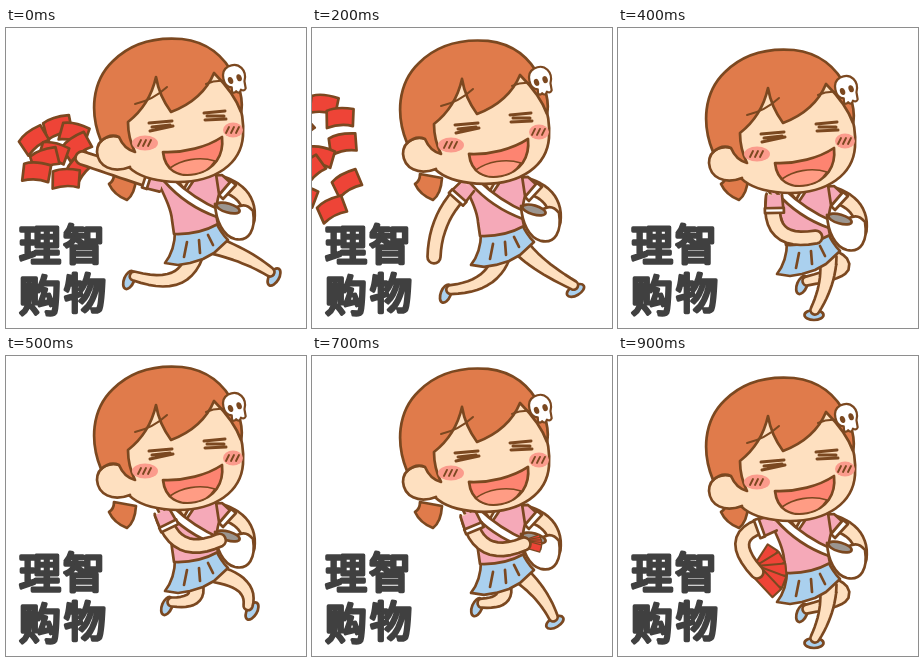
An HTML page for the animation above (1 s loop, 300 by 300 pixels).

```html
<!DOCTYPE html>
<html lang="zh">
<head>
<meta charset="utf-8">
<style>
html, body { margin: 0; width: 100%; height: 100%; overflow: hidden; background: #fff; }
svg { display: block; width: 100vw; height: 100vh; }
text { font: 400 42px "Noto Sans CJK SC", "Noto Sans CJK", sans-serif; fill: #404040; stroke: #404040;
  stroke-width: 3.4; stroke-linejoin: round; stroke-linecap: round; text-anchor: middle; }
.pose { opacity: 0; }
</style>
</head>
<body>
<svg viewBox="0 0 300 300">
  <text x="34 78" y="233 232">理智</text>
  <text x="34 79" y="283 281">购物</text>
  <g id="stage" stroke="#7b4820" stroke-width="2.7" stroke-linejoin="round" stroke-linecap="round"></g>
</svg>
<script>
const SKIN = '#fee0c0', HAIR = '#e07b4b', PINK = '#f5a9b8', BLUE = '#aad0ee', RED = '#ee4437', BROWN = '#7b4820';

const path = (d, fill = 'none', more = '') => `<path d="${d}" fill="${fill}" ${more}/>`;
const oval = (x, y, rx, ry, fill, turn = 0, more = '') =>
  `<ellipse rx="${rx}" ry="${ry}" fill="${fill}" transform="translate(${x} ${y}) rotate(${turn})" ${more}/>`;
const mix = (a, b, t) => a.map((v, i) => v + (b[i] - v) * t);

// Tapered limb bent at the middle joint, round at the far end
function limb(a, joint, b, w0, w1) {
  const c = joint.map((v, i) => v * 1.5 - (a[i] + b[i]) / 4);
  const left = [], right = [], n = 12;
  for (let i = 0; i <= n; i++) {
    const t = i / n, p = mix(a, c, t), q = mix(c, b, t), [x, y] = mix(p, q, t);
    const turn = Math.atan2(q[1] - p[1], q[0] - p[0]), w = (w0 + (w1 - w0) * t) / 2;
    const dx = -Math.sin(turn) * w, dy = Math.cos(turn) * w;
    left.push(`${(x + dx).toFixed(1)} ${(y + dy).toFixed(1)}`);
    right.unshift(`${(x - dx).toFixed(1)} ${(y - dy).toFixed(1)}`);
  }
  return path(`M${left.join('L')}A${w1 / 2} ${w1 / 2} 0 0 0 ${right.join('L')}`, SKIN);
}

function leg(hip, knee, foot, heel, turn) {
  const ankle = foot.map((v, i) => v + heel[i]);
  return oval(...foot, 9.5, 5, BLUE, turn) + limb(hip, knee, ankle, 17, 9);
}

// Each jump goes from a spread pose (u = 0) to standing on the front foot (u = 1)
const jumps = [
  { front: [268, 249], back: [123, 252], knee: [171, 255], dip: 18 },
  { front: [246, 255], back: [161, 250], knee: [190, 244], dip: 0 }
];

function legs(jump, u, drop) {
  const front = [mix(jump.front, [196], u ** 4)[0], jump.front[1] + (287 - jump.front[1]) * u ** 1.5];
  const back = mix(jump.back, [184, 257], u ** 2.5);
  back[1] += jump.dip * Math.sin(Math.PI * u * u);
  return leg(mix([188, 228], [213, 230], u ** 4), mix(jump.knee, [230, 241], u ** 4), back, [5, -4], 112)
    + leg([210, 218 + drop], mix([240, 229], [209, 255], u ** 1.5), front, [-4 + 5 * u, -5], -60 * (1 - u));
}

const SHOULDER = [156, 156];

function arm(hand) {
  const dx = hand[0] - SHOULDER[0], dy = hand[1] - SHOULDER[1], d = Math.hypot(dx, dy);
  const bend = Math.sqrt(Math.max(0, 41 ** 2 - d * d / 4)) / d;
  const elbow = [SHOULDER[0] + dx / 2 - dy * bend, SHOULDER[1] + dy / 2 + dx * bend];
  const turn = Math.atan2(elbow[1] - SHOULDER[1], elbow[0] - SHOULDER[0]) * 180 / Math.PI;
  return limb(SHOULDER, elbow, hand, 15, 13)
    + `<g transform="translate(${SHOULDER}) rotate(${turn})">`
    + path('M0 -8L14 -9V9L0 8', PINK) + path('M13 -9.5L18 -9.5V9.5L13 9.5Z', '#fff') + '</g>';
}

// Hand positions at a few steps of the loop
const reach = [[0, 76, 130], [1, 68, 148], [2, 122, 227], [3, 182, 212], [5, 214, 184], [7, 212, 186], [9, 139, 205]];

function handAt(step) {
  const i = Math.max(1, reach.findIndex(k => k[0] >= step)), a = reach[i - 1], b = reach[i];
  return mix(a, b, (step - a[0]) / (b[0] - a[0])).slice(1);
}

// Thrown cards drift left while they spread and flutter
function thrown(step) {
  let out = '';
  for (let i = 0; i < 9 && step < 4; i++) {
    const x = 52 + 24 * Math.sin(i * 2.4) - 20 * step;
    const y = 125 + 2 * step + (i - 4) * 6.5 * (1 + step * .5);
    const turn = -18 + 32 * Math.sin(i * 1.9 + step * .4);
    out += `<g transform="translate(${x} ${y}) rotate(${turn})">` + path('M-13 -8Q-3 -12 14 -8L12 9Q0 5 -14 9Z', RED) + '</g>';
  }
  return out;
}

// Cards pulled out of the bag open as a fan in the hand
function fan(step, [x, y]) {
  const open = (step - 6) / 3;
  let out = '';
  for (let i = 0; i < 5 && open > 0; i++)
    out += `<g transform="translate(${x} ${y}) rotate(${(i - 2.2) * 26 * open}) scale(${.4 + .6 * open})">`
      + path('M2 -6H29V6H2Z', RED, 'stroke-width="2"') + '</g>';
  return out;
}

const ponytail = path('M108 146Q108 153 103 156Q108 167 121 172Q129 166 130 150Z', HAIR);

const body = path('M169 203C169 216 166 226 159 235L172 237L184 235L197 231L208 225L222 212C217 207 213 201 210 194Z', BLUE)
  + path('M181 214L178 229M193 212L194 225M202 207L207 217')
  + limb([216, 156], [240, 168], [243, 192], 15, 11)
  + path('M204 148L216 147L227 157L216 168L206 163Z', PINK)
  + path('M225 153L230 157L217 171L213 167Z', '#fff')
  + path('M150 150C158 167 165 180 166 192L168 206Q192 207 212 196C209 186 210 178 213 166L210 146Z', PINK)
  + path('M164 151L178 167L188 152', '#fff')
  + path('M170 150L178 161L184 150Z', SKIN)
  + path('M158 153L166 150Q188 171 214 182L211 189Q180 178 158 153Z', '#fff')
  + path('M209 176C210 193 217 208 229 211C243 214 250 202 247 183C243 178 239 176 234 178C226 182 216 180 209 176Z', '#fff')
  + oval(222, 180, 12, 4.5, '#9b9691', 16);

const skull = '<g transform="translate(229 50) rotate(-18)">'
  + path('M-6 8C-14 5 -13 -11 -3 -13C9 -15 14 -3 8 6L7 13Q5 16 2 13Q-1 17 -3 13Q-6 15 -7 12Z', '#fff', 'stroke-width="2.2"')
  + oval(-5, 1, 2.6, 3.6, BROWN, 0, 'stroke="none"') + oval(4, 1, 2.6, 3.6, BROWN, 0, 'stroke="none"') + '</g>';

const blush = (x, y, rx) => oval(x, y, rx, 7.5, '#fb9b8c', 0, 'stroke="none"')
  + path([-4, 1, 6].map(d => `M${x + d} ${y - 3}l-3 6`).join(''), 'none', 'stroke-width="1.9"');

const head = path('M108 108C114 139 130 153 172 154C209 154 235 136 237 108C238 95 236 82 231 68L208 42L145 48Z', SKIN)
  + path('M120 112C105 103 91 111 91 124C92 138 106 146 124 139', SKIN)
  + path(`M95 113C84 86 85 54 107 33C127 13 152 9 176 11C202 14 219 29 229 50
    C235 63 237 75 235 84C229 67 218 55 208 45C201 62 186 76 165 84
    C157 73 152 61 150 49C146 67 136 83 122 94Q122 110 129 124Q118 121 113 109Q104 105 95 113Z`, HAIR)
  + path('M129 76Q147 72 161 59M200 56Q209 52 219 53', 'none', 'stroke-width="2"')
  + blush(139, 115, 13) + blush(227, 102, 10)
  + path('M143 95L166 93M146 99L164 97M144 103L167 98M198 85L219 83M201 88H218M199 92L220 91', 'none', 'stroke-width="3"')
  + path('M157 124C178 125 201 119 216 109C218 127 209 142 189 146C173 149 159 143 157 124Z', '#fd8471')
  + path('M164 140C175 132 193 128 209 133C203 142 198 144 189 146C179 148 170 146 164 140Z', '#ff9c84', 'stroke-width="1.6"')
  + skull;

function pose(step) {
  const u = step % 5 / 4, drop = 11 * u ** 2.5, hand = handAt(step);
  return '<g class="pose">' + ponytail + legs(jumps[step < 5 ? 0 : 1], u, drop) + thrown(step)
    + `<g transform="translate(0 ${drop})">${body + fan(step, hand) + arm(hand) + head}</g></g>`;
}

const stage = document.getElementById('stage');
stage.innerHTML = Array.from({ length: 10 }, (_, i) => pose(i)).join('');

[...stage.children].forEach((g, i) => g.animate([
  { opacity: 1, easing: 'steps(1, end)' },
  { opacity: 0, offset: .09999 },
  { opacity: 0 }
], { duration: 1000, delay: i * 100 - 1000, iterations: Infinity }).startTime = 0);
</script>
</body>
</html>
```
